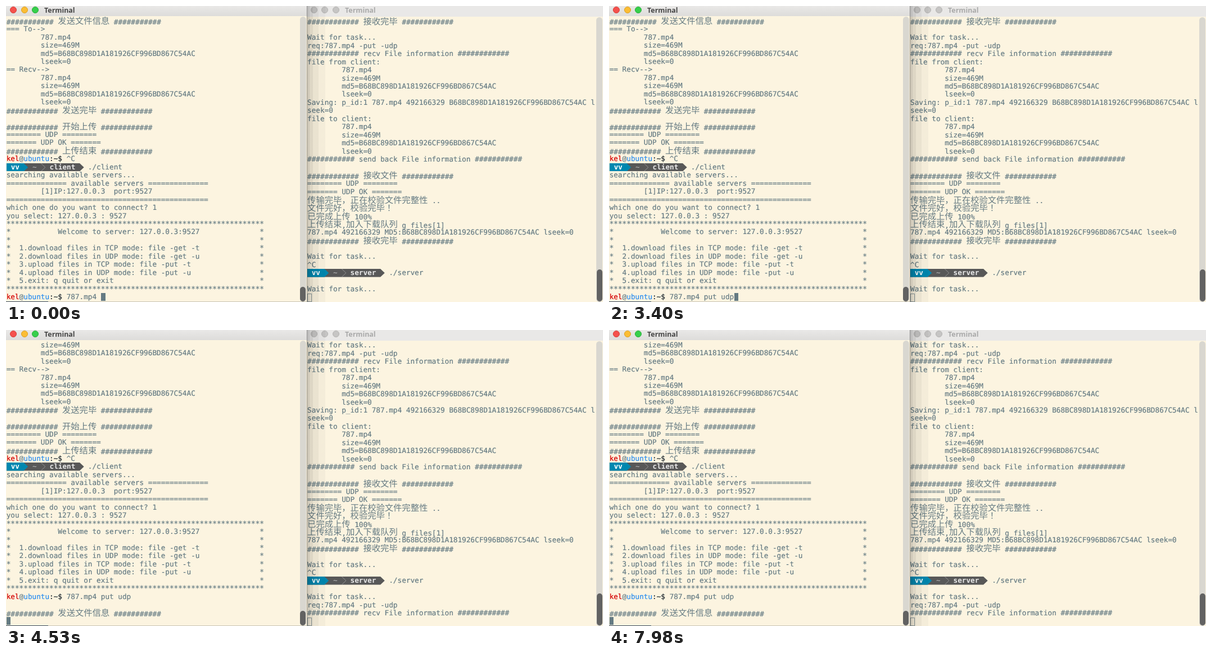
Recreate the animation shown at these times as an HTML page. Size 1062 by 527 pixels, loop 8000 ms.

```html
<!DOCTYPE html>
<html lang="en">
<head>
<meta charset="utf-8">
<title>Terminal</title>
<style>
  :root { --rh: 14.45px; --ink: #657b83; --paper: #fcf4e0; }
  html, body { margin: 0; width: 1062px; height: 527px; overflow: hidden; background: var(--paper); }
  .win { position: absolute; top: 0; height: 527px; overflow: hidden; background: var(--paper); }
  #left { left: 0; width: 535px; }
  #right { left: 535px; width: 527px; }
  .bar { position: absolute; inset: 0 0 auto; height: 18px; background: linear-gradient(#e9e8e7, #dddcda); }
  #right .bar { height: 19px; background: #e9e8e7; }
  .bar b { position: absolute; left: 68px; top: 0; font: 700 12.4px/16px "Open Sans", "Noto Sans", sans-serif; color: #454545; }
  #right .bar b { color: #a9a9a9; }
  .bar i { position: absolute; top: 1px; width: 10px; height: 10px; border: 1px solid; border-radius: 50%; }
  .screen { position: absolute; inset: 18px 0 0; overflow: hidden; color: var(--ink);
    font: 12.707px/14.45px "DejaVu Sans Mono", monospace; text-rendering: geometricPrecision;
    -webkit-text-stroke: .2px; }
  .row { position: absolute; white-space: pre; height: var(--rh); }
  .cjk { font: 15.3px/14px "Noto Sans CJK JP", "Noto Sans CJK", sans-serif; position: relative; top: -.5px;
    -webkit-text-stroke: 0; }
  .cur { position: absolute; width: 7.6px; height: 14px; background: var(--ink); }
  #right .cur { background: none; border: 1px solid #8b999b; box-sizing: border-box; height: 15px; }
  .user { color: #d40000; }
  .host { color: #268bf0; }
  .dir { color: #1f2a30; }
  .line { display: block; position: absolute; left: 0; top: 0; }
  .trough { position: absolute; width: 11px; background: #d9d7d0; border-radius: 6px; }
  .thumb { position: absolute; width: 10px; background: #626262; border-radius: 5px; }
  .shade { position: absolute; left: 0; top: 0; width: 40px; height: 527px;
    background: linear-gradient(90deg, rgba(0,0,0,.4) 1px, rgba(0,0,0,.18) 1px 5px, rgba(0,0,0,.12) 5px 11px,
      rgba(0,0,0,.07) 11px 21px, rgba(0,0,0,.03) 21px 33px, transparent 33px); }
  .edge { position: absolute; left: 0; top: 526px; width: 535px; height: 1px;
    background: linear-gradient(90deg, #34465c 75px, #c9c4b5 75px); }
</style>
</head>
<body>
<div class="win" id="left">
  <div class="screen"></div>
  <div class="bar"><b>Terminal</b></div>
  <div class="trough" style="left:523px;top:19px;height:507px"></div>
  <div class="thumb" style="left:523px;top:500px;height:26px"></div>
  <div class="edge"></div>
</div>
<div class="win" id="right">
  <div class="screen"></div>
  <div class="bar"><b>Terminal</b></div>
  <div class="trough" style="left:515px;top:20px;height:507px"></div>
  <div class="thumb" style="left:516px;top:469px;height:57px"></div>
  <div class="shade"></div>
</div>
<script>
const CW = 7.65, RH = 14.45, LOOP = 8000, LAST = 34, TYPED = 'put udp';
const MD5 = 'B68BC898D1A181926CF996BD867C54AC', FILE = '787.mp4';

const wrap = (word, n, c = '#') => `${c.repeat(n)} ${word} ${c.repeat(n)}`;
const tab = s => ' '.repeat(8) + s;
const info = [FILE, 'size=469M', 'md5=' + MD5, 'lseek=0'].map(tab);
const boxed = (s = '') => '*' + s.padEnd(58) + '*';
const udp = [wrap('UDP', 8, '='), wrap('UDP OK', 7, '=')];
const prompt = s => ({ prompt: s });
const power = name => ({ power: name });

const leftRows = [
  wrap('发送文件信息', 11), '=== To-->', ...info, '== Recv-->', ...info,
  wrap('发送完毕', 12), '', wrap('开始上传', 12), ...udp, wrap('上传结束', 12),
  prompt('^C'), power('client'), 'searching available servers...',
  wrap('available servers', 14, '='), tab('[1]IP:127.0.0.3  port:9527'), '='.repeat(47),
  'which one do you want to connect? 1', 'you select: 127.0.0.3 : 9527',
  '*'.repeat(60), boxed(' '.repeat(11) + 'Welcome to server: 127.0.0.3:9527'), boxed(),
  boxed('  1.download files in TCP mode: file -get -t'),
  boxed('  2.download files in UDP mode: file -get -u'),
  boxed('  3.upload files in TCP mode: file -put -t'),
  boxed('  4.upload files in UDP mode: file -put -u'),
  boxed('  5.exit: q quit or exit'), '*'.repeat(60),
  prompt(FILE + ' '), '', wrap('发送文件信息', 11)
];
const task = [`req:${FILE} -put -udp`, wrap('recv File information', 12)];
const rightRows = [
  wrap('接收完毕', 12), '', 'Wait for task...', ...task, 'file from client:', ...info,
  `Saving: p_id:1 ${FILE} 492166329 ${MD5} l`, 'seek=0', 'file to client:', ...info,
  wrap('send back File information', 11), '', wrap('接收文件', 12), ...udp,
  '传输完毕，正在校验文件完整性 ..', '文件完好，校验完毕！', '已完成上传 100%',
  '上传结束,加入下载队列 g_files[1]', `${FILE} 492166329 MD5:${MD5} lseek=0`,
  wrap('接收完毕', 12), '', 'Wait for task...', '^C', power('server'), '',
  'Wait for task...', ...task
];

const text = s => s.replace(/&/g, '&amp;').replace(/</g, '&lt;')
  .replace(/[\u4e00-\u9fff\uff01-\uff0f]+/g, m => `<span class="cjk">${m}</span>`);

function powerline(name) {
  const x = n => n * CW, end = 11 + name.length, mid = RH / 2;
  const arrow = (c, fill) => `<path fill="${fill}" d="M0 0H${x(c)}L${x(c + 1)} ${mid}L${x(c)} ${RH}H0Z"/>`;
  const label = (c, s, style) => `<tspan x="${x(c)}" ${style}>${s}</tspan>`;
  return `<svg class="line" width="160" height="${RH}">${arrow(end, '#585858')}${arrow(4, '#0087af')}
    <path d="M${x(8)} 0L${x(9)} ${mid}L${x(8)} ${RH}" fill="none" stroke="#a0a0a0" stroke-width=".8"/>
    <text y="11.4">${label(1, 'vv', 'fill="#fff" font-weight="700"')}${label(6, '~', 'fill="#bcbcbc"')}${
    label(10, name, 'fill="#e8e8e8" font-weight="700"')}</text></svg>` + ' '.repeat(end + 2) + './' + name;
}

function markup(row) {
  if (row.power) return powerline(row.power);
  if (row.prompt) return '<span class="user">kel</span>@<span class="host">ubuntu</span>' +
    `<span class="dir">:~$</span> ${row.prompt}`;
  return text(row);
}

function makeWindow(id, rows, x, y, lastRow, lightX, lights) {
  const win = document.getElementById(id), screen = win.querySelector('.screen');
  const add = (cls, html) => {
    const el = document.createElement('div');
    el.className = cls;
    el.innerHTML = html;
    el.style.left = x + 'px';
    return screen.appendChild(el);
  };
  const cursor = add('cur', '');
  cursor.style.top = y + LAST * RH + 'px';
  const els = rows.map(r => add('row', markup(r)));
  lights.forEach(([fill, rim], i) => {
    const dot = document.createElement('i');
    dot.style.cssText = `left:${lightX + i * 19.5}px;background:${fill};border-color:${rim}`;
    win.querySelector('.bar').append(dot);
  });
  const scroll = n => els.forEach((el, i) => {
    el.style.top = y + (i - n) * RH + 'px';
    el.style.display = i >= n && i - n <= lastRow ? '' : 'none';
  });
  return { els, cursor, scroll, x };
}

const grey = ['#c6c5c4', '#b5b4b3'];
const left = makeWindow('left', leftRows, .7, 1.7, LAST, 7,
  [['#f5514d', '#d63c38'], ['#fbbd34', '#dc9f22'], ['#37cf4b', '#25b038']]);
const right = makeWindow('right', rightRows, 1.1, 2.4, LAST - 1, 6.5, [grey, grey, grey]);
const entry = left.els[LAST].appendChild(document.createElement('span'));

// time, typed letters, cursor lit, left scroll, right scroll
const steps = [
  [0, 0, 1], [490, 0, 0], [860, 1, 1], [1360, 2, 1], [1860, 3, 1], [2100, 4, 1], [2690, 4, 0],
  [2940, 5, 1], [3060, 6, 1], [3400, 7, 1], [3950, 7, 0], [4410, 7, 1, 1],
  [4530, 7, 1, 3, 2], [5020, 7, 0, 3, 2], [5610, 7, 1, 3, 2], [6200, 7, 0, 3, 2],
  [6800, 7, 1, 3, 2], [7380, 7, 0, 3, 2], [7980, 7, 1, 3, 2]
];

let shown, start;
function draw(now) {
  start ??= now;
  const t = (now - start) % LOOP;
  const step = steps.findLast(s => s[0] <= t) || steps[0];
  if (step !== shown) {
    const [, typed, lit, up = 0, upRight = 0] = shown = step;
    entry.textContent = TYPED.slice(0, typed);
    left.scroll(up);
    right.scroll(upRight);
    left.cursor.style.left = left.x + (up ? 0 : 22 + typed) * CW + 'px';
    left.cursor.style.visibility = lit ? 'visible' : 'hidden';
  }
  requestAnimationFrame(draw);
}
draw(performance.now());
</script>
</body>
</html>
```
